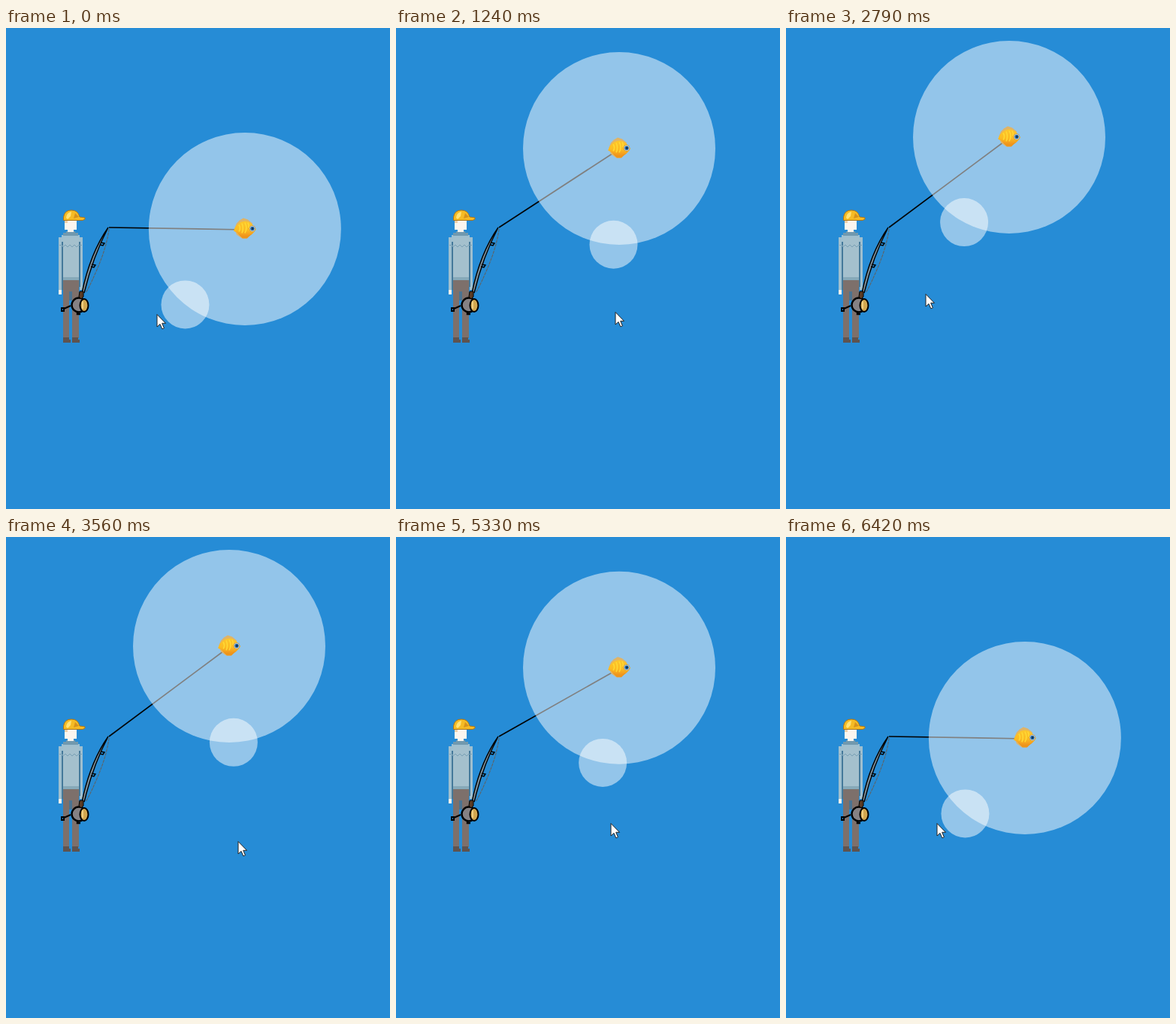
An HTML page for the animation above (6.5 s loop, 511 by 639 pixels).

```html
<!DOCTYPE html>
<html lang="en">
<head>
<meta charset="utf-8">
<title>Fishing</title>
<style>
html, body { margin: 0; width: 100%; height: 100%; overflow: hidden; background: #268cd6; }
svg { display: block; width: 100%; height: 100%; }
</style>
</head>
<body>
<svg viewBox="0 0 511 639" preserveAspectRatio="none">
  <defs>
    <linearGradient id="scales" x1="0" y1="0" x2="0" y2="1">
      <stop offset="0" stop-color="#fcc62c"/>
      <stop offset=".55" stop-color="#fcbc22"/>
      <stop offset="1" stop-color="#ef8f1c"/>
    </linearGradient>
  </defs>
  <rect width="511" height="639" fill="#268cd6"/>

  <!-- angler -->
  <g shape-rendering="crispEdges">
    <path d="M76 335H97V412H88V350H84V412H76Z" fill="#7d706b"/>
    <path d="M84 350H88V362H84Z" fill="#4a7391"/>
    <path d="M76 411H84V414H86V418H76ZM88 411H96V414H98V418H88Z" fill="#5e534f"/>
    <path d="M70 278H74V275H78V272H94V275H98V278H102V348H98V335H76V348H70Z" fill="#9fbfcf"/>
    <path d="M76 278H97V335H76Z" fill="#a4c0cd"/>
    <path d="M80 270H92V272H96V276H76V272H80Z" fill="#7299ae"/>
    <path d="M74 284H76V348H74ZM97 284H99V344H97Z" fill="#44799a"/>
    <path d="M76 331H97V335H76Z" fill="#86a9b9"/>
    <path d="M71 288H74L76 291L79 288L82 291L85 288L88 291L91 288L94 291L97 288H101" fill="none" stroke="#789fb4"/>
    <path d="M70 348H74V354H70Z" fill="#f7efe9"/>
    <path d="M78 254H94V268H90V271H82V268H78Z" fill="#fbf5ef"/>
    <path d="M78 254H82V259H78Z" fill="#f0cfa9"/>
  </g>
  <path d="M76.5 255.5V251Q78 242 87 242Q96 242 98 251L105 252V254L102 255.5Z" fill="#f6bb25" stroke="#a8741b"/>
  <path d="M80 252Q81 245 87 244L86 250L82 254Z" fill="#ffe377"/>
  <path d="M92 246L97 251L90 253Z" fill="#d8921b"/>

  <!-- rod and reel -->
  <g fill="none" stroke="#000">
    <path d="M137 267Q134 291 121 321T106 351" stroke="#5a666e" stroke-width="1.2" stroke-dasharray="4 1"/>
    <path d="M86 369L77 373V376H74V372H78" stroke-width="2"/>
    <circle cx="97" cy="368" r="9.5" fill="#858184" stroke-width="2.4"/>
    <ellipse cx="104" cy="368.5" rx="5.5" ry="8.5" fill="#d2a750" stroke-width="2"/>
    <path d="M102 363V373" stroke="#f0cf83" stroke-width="2"/>
    <path d="M95 378V380H99" stroke-width="2.4"/>
    <path d="M101 352Q112 299 136 265Q116 303 104 352" fill="#7b8f9c" stroke-width="1.4"/>
    <path d="M126 285L131 286L129 289L125 288M114 314L119 315L117 318L113 317" stroke-width="1.4"/>
    <path d="M98 350H103V357L100 360L97 357Z" fill="#5c3b22"/>
  </g>

  <path id="line" stroke="#000" stroke-width="1.7" fill="none"/>
  <circle id="zone" r="128" fill="#fff" fill-opacity=".5"/>
  <circle id="knob" r="32" fill="#fff" fill-opacity=".5"/>

  <g id="fish">
    <path d="M-14 0L-11 -7L-7 -11L-2 -14L4 -12L10 -7L7 9L2 13L-4 13L-11 8Z" fill="#dfb468"/>
    <path d="M-15 3L-12 -3Q-7 -10 1 -10Q9 -9 15 1Q10 9 3 11Q-5 12 -11 5Z" fill="url(#scales)"/>
    <path d="M-9 7Q0 13 9 7L3 13H-3Z" fill="#ee951b"/>
    <path d="M-8 -5Q-5 0 -8 4M-4 -7Q-1 0 -4 6M0 -8Q4 -1 0 6M4 -8Q6 -4 5 -1" fill="none" stroke="#ffda35" stroke-width="1.5"/>
    <circle cx="10" r="3.9" fill="#dce8ee" stroke="#9b722d" stroke-width=".6"/>
    <circle cx="10" r="2.7" fill="#2268a8"/>
    <circle cx="10.3" r="1.2" fill="#12283f"/>
  </g>

  <path id="cursor" d="M0 .5V17L4 13.4L6.8 19.8L9.4 18.7L6.7 12.3H11.5Z" fill="#fff" stroke="#222"/>
</svg>
<script>
const LOOP = 6500, STEPS = 84;
const ROD_TIP = [137, 265], REACH = 128;

// Turning points of the pointer: step, x, y.
const TURNS = [
  [0, 201, 380], [8, 88, 318], [14, 286, 380], [18, 298, 374], [24, 25, 111],
  [27, 25, 111], [32, 6, 272], [35, 62, 301], [37, 309, 404], [41, 412, 57]
];

const $ = id => document.getElementById(id);
const line = $('line'), zone = $('zone'), knob = $('knob'), fish = $('fish'), cursor = $('cursor');

const smooth = f => f * f * (3 - 2 * f);

function pointerAt(step) {
  const next = Math.max(1, TURNS.findIndex(turn => turn[0] >= step));
  const [s0, x0, y0] = TURNS[next - 1], [s1, x1, y1] = TURNS[next];
  const f = smooth((step - s0) / (s1 - s0));
  return [x0 + (x1 - x0) * f, y0 + (y1 - y0) * f];
}

// The fish swims diagonally, then straight up until the line is taut.
function fishAt(step) {
  const y = Math.max(145, 267 - 6.45 * step - .015 * step * step);
  return [297 + .326 * Math.max(0, y - 203), y];
}

// The knob drifts off the pointer's bearing while the fish is swimming.
function drift(step) {
  return step < 16.7 ? .21 * (step - 1.96) * (16.7 - step) * Math.PI / 180 : 0;
}

function place(el, x, y) {
  el.setAttribute('transform', `translate(${x.toFixed(2)} ${y.toFixed(2)})`);
}

function render(time) {
  const tick = Math.min(STEPS - 1, Math.floor((time % LOOP + 12) * STEPS / LOOP));
  // The motion plays forwards, then backwards.
  const step = Math.min(tick, STEPS - 1 - tick);
  const [fx, fy] = fishAt(step);
  const [px, py] = pointerAt(step);
  const angle = Math.atan2(py + 3 - fy, px - fx) + drift(step);

  place(zone, fx, fy);
  place(fish, fx, fy - .5);
  place(knob, fx + REACH * Math.cos(angle), fy + REACH * Math.sin(angle));
  place(cursor, Math.round(px), Math.round(py));
  line.setAttribute('d', `M${ROD_TIP}L${fx} ${fy + 1}`);
}

const start = performance.now();
function loop() {
  render(performance.now() - start);
  requestAnimationFrame(loop);
}
loop();
</script>
</body>
</html>
```
